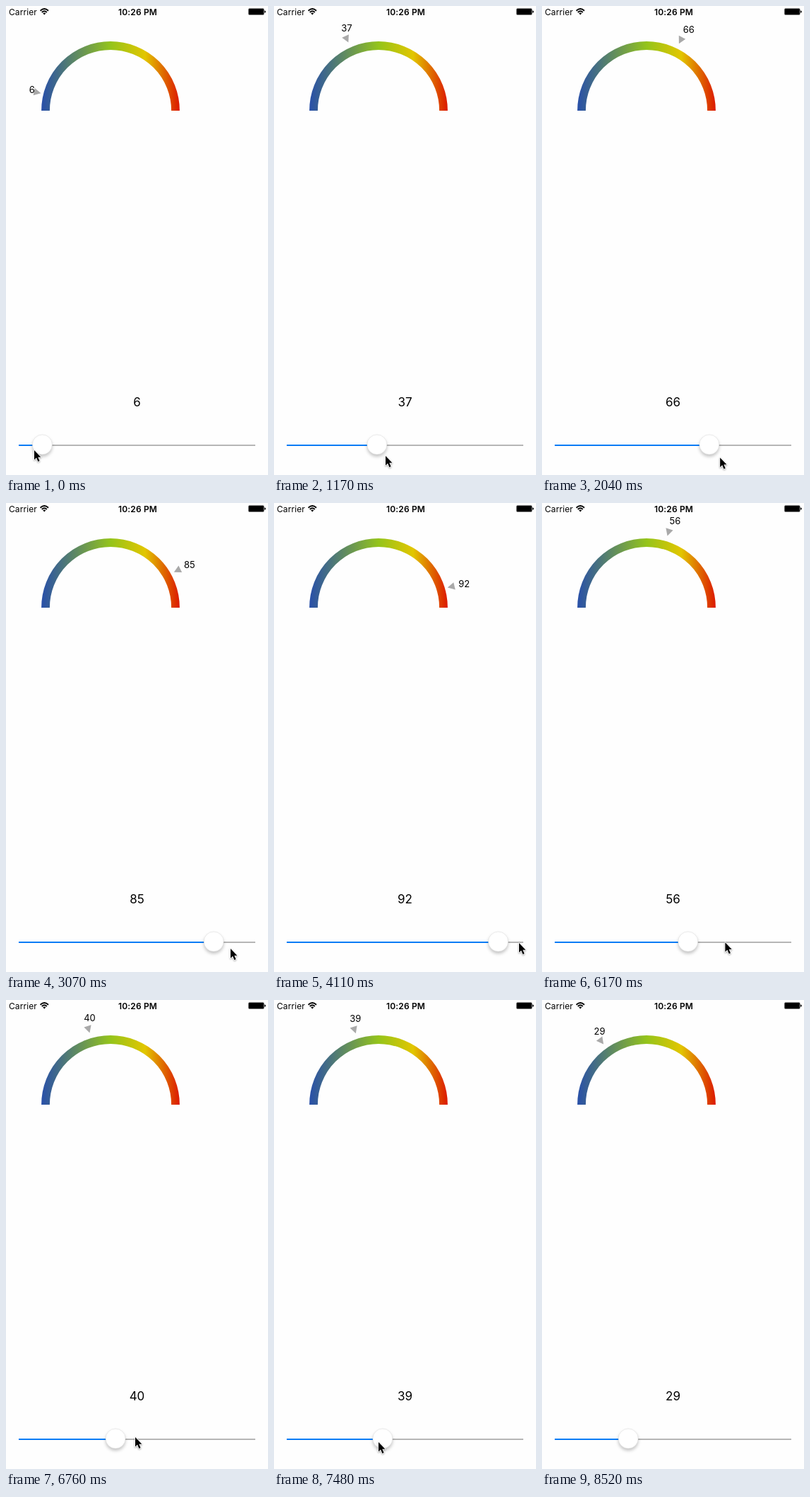
Write an HTML page that moves like this. It is 371x663 px and loops after 9.71 s.

```html
<!DOCTYPE html>
<html lang="en">
<head>
<meta charset="utf-8">
<title>Gauge and slider</title>
<style>
html, body { margin: 0; width: 100%; height: 100%; overflow: hidden; background: #fefefe; }
svg { position: absolute; left: 0; top: 0; display: block; }
text { font-family: Inter, Roboto, sans-serif; fill: #000; }
.mid { text-anchor: middle; }
#knob { filter: drop-shadow(0 3px 2px rgba(0, 0, 0, .22)); }
#cursor { filter: drop-shadow(0 1px 1px rgba(0, 0, 0, .35)); }
</style>
</head>
<body>
<svg width="371" height="663" viewBox="0 0 371 663">
  <linearGradient id="heat" gradientUnits="userSpaceOnUse" x1="50" x2="246">
    <stop offset="0" stop-color="#284fa9"/>
    <stop offset=".5" stop-color="#94c41b"/>
    <stop offset=".75" stop-color="#e2c600"/>
    <stop offset="1" stop-color="#dc1800"/>
  </linearGradient>
  <path d="M56 148A92 92 0 0 1 240 148" fill="none" stroke="url(#heat)" stroke-width="11.8"/>

  <text x="4" y="12.5" font-size="12" letter-spacing=".1">Carrier</text>
  <g fill="none" stroke="#000" stroke-width="1.9">
    <path d="M48.6 6.8Q54.3 1.4 60 6.8"/>
    <path d="M50.8 9Q54.3 5.7 57.8 9"/>
  </g>
  <path d="M52.2 10.3Q54.3 8.5 56.4 10.3L54.3 12.6Z"/>
  <text class="mid" x="186.6" y="12.5" font-size="12" font-weight="600" letter-spacing=".15">10:26 PM</text>
  <rect x="343.3" y="3.5" width="22" height="9" rx="1.5" stroke="#888" stroke-width=".6"/>
  <path d="M366 6.2Q367.8 6.6 367.8 8T366 9.8Z"/>

  <path id="arrow" d="M-5 0L5 -5.3V5.3Z" fill="#a9a9a9"/>
  <text id="tag" class="mid" font-size="13"></text>
  <text id="big" class="mid" x="185.5" y="566.3" font-size="17"></text>

  <path d="M18 621H353" stroke="#b6b6b6" stroke-width="2"/>
  <path id="fill" stroke="#057cf5" stroke-width="2"/>
  <circle id="knob" cy="620" r="14" fill="#fff" stroke="#d4d4d4" stroke-width=".5"/>
  <path id="cursor" d="M1 1V14.4L4 11.6L6.4 17L8.6 16L6.3 10.8H10.4Z"
    stroke="#fff" stroke-width="1.6" paint-order="stroke" stroke-linejoin="round"/>
</svg>
<script>
const LOOP = 9710, STEP = 146.2;   // the picture updates once per step
const LAG = 0.25;                  // share of the last move the needle still has to make

// Drag stops: step, slider value, cursor x, cursor y
const stops = [
  [0, 6.3, 39, 627], [8, 37, 157, 635], [14, 72.5, 270, 638],
  [18, 85.2, 317, 629], [20, 85.2, 317, 629], [28, 92.8, 346, 621],
  [31, 100, 363, 621], [35, 100, 361, 621], [38, 100, 336, 621],
  [43, 46, 239, 620], [46, 40, 182, 617], [51, 39.6, 147, 624],
  [54, 29.3, 113, 619], [55, 29.3, 113, 619], [58, 29.3, 250, 690]
];

const [arrow, tag, big, fill, knob, cursor] =
  ['arrow', 'tag', 'big', 'fill', 'knob', 'cursor'].map(id => document.getElementById(id));

const set = (node, attrs) => {
  for (const k in attrs) node.setAttribute(k, attrs[k]);
};

function poseAt(step) {
  const i = stops.findIndex(s => s[0] > step);
  if (i < 0) return stops[stops.length - 1];
  const a = stops[i - 1], b = stops[i];
  const k = (step - a[0]) / (b[0] - a[0]);
  return a.map((v, j) => v + (b[j] - v) * k);
}

function draw(step) {
  const [, value, cx, cy] = poseAt(step);
  const before = poseAt(Math.max(0, step - 1))[1];
  const needle = value + (before - value) * LAG;
  const angle = Math.PI * (1 - needle / 100);
  const c = Math.cos(angle), s = Math.sin(angle);
  const turn = -angle * 180 / Math.PI;
  const x = 32 + 3.077 * value;

  set(arrow, { transform: `translate(${148 + 105.5 * c} ${143 - 106 * s}) rotate(${turn})` });
  set(tag, { x: 153.5 + 119 * c, y: 147.7 - 123.5 * s });
  tag.textContent = big.textContent = Math.floor(value + 1e-6);
  set(fill, { d: `M18 621H${x}` });
  set(knob, { cx: x });
  set(cursor, { transform: `translate(${cx} ${cy})` });
}

let start;
function frame(now) {
  start ??= now;
  draw(Math.floor((now - start) % LOOP / STEP));
  requestAnimationFrame(frame);
}
draw(0);
requestAnimationFrame(frame);
</script>
</body>
</html>
```
